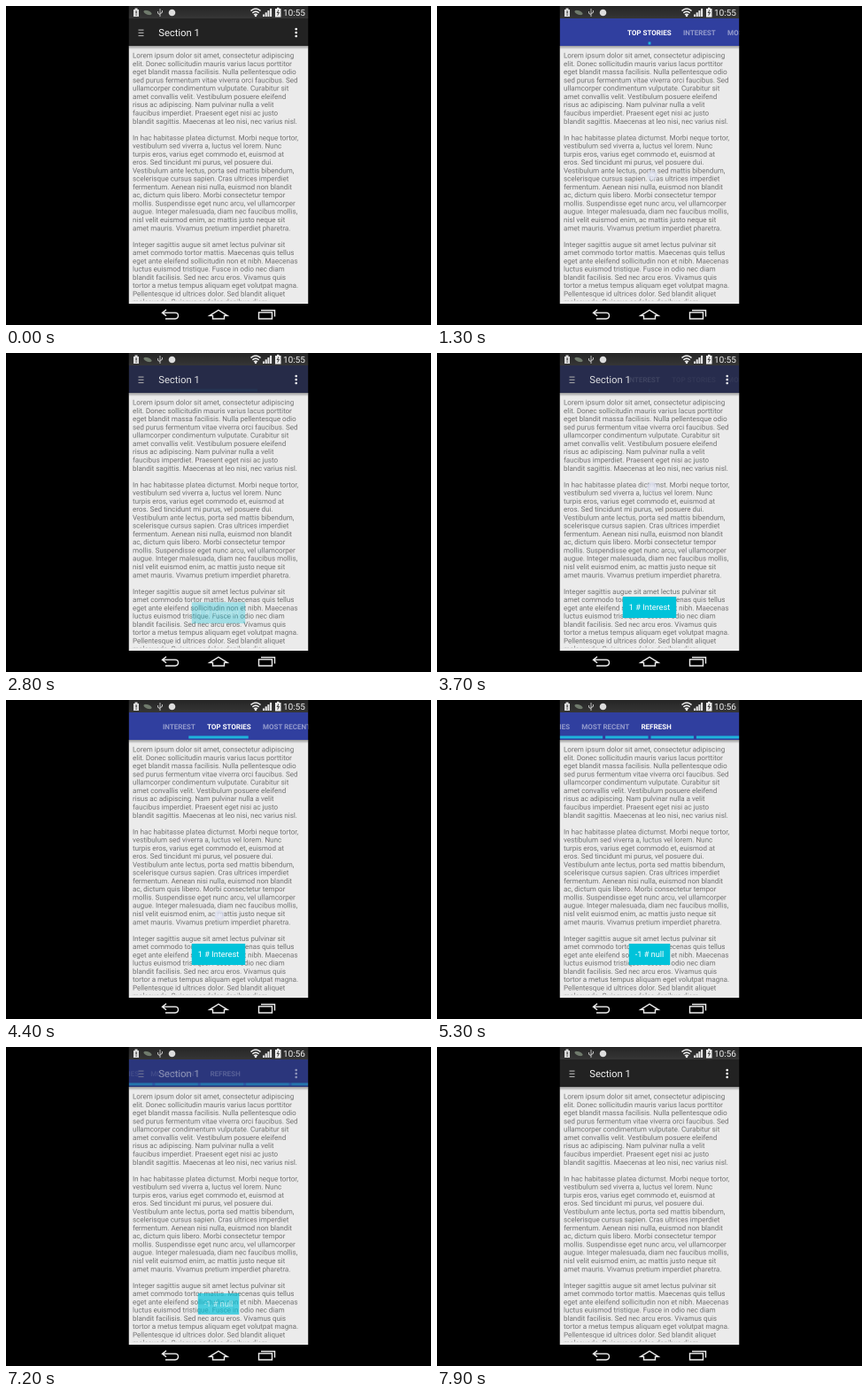
An HTML page with a canvas for the animation above (8 s loop, 480x360 px).

```html
<!DOCTYPE html>
<html lang="en">
<head>
<meta charset="utf-8">
<title>Pull to select</title>
<style>
  html, body { margin: 0; width: 100%; height: 100%; overflow: hidden; background: #000; }
  canvas { display: block; width: 480px; height: 360px; }
</style>
</head>
<body>
<canvas id="stage" width="960" height="720"></canvas>
<script>
const ctx = document.getElementById('stage').getContext('2d');
// Double resolution keeps the small text unhinted and soft.
ctx.scale(2, 2);
ctx.textRendering = 'geometricPrecision';

const LOOP = 8000, LEFT = 138.75, RIGHT = 341.25, WIDTH = RIGHT - LEFT, CENTER = 240;
const BAR_TOP = 14, BAR_BOTTOM = 45, BAR_HEIGHT = BAR_BOTTOM - BAR_TOP;
const BLUE = '#303f9f', CYAN = '#1eb4dc', FONT = 'Roboto, sans-serif', TAB_FONT = `bold 8px ${FONT}`;
const TAB_GAP = 13.3, TAB_START = 215;

const BODY = `Lorem ipsum dolor sit amet, consectetur adipiscing
elit. Donec sollicitudin mauris varius lacus porttitor
eget blandit massa facilisis. Nulla pellentesque odio
sed purus fermentum vitae viverra orci faucibus. Sed
ullamcorper condimentum vulputate. Curabitur sit
amet convallis velit. Vestibulum posuere eleifend
risus ac adipiscing. Nam pulvinar nulla a velit
faucibus imperdiet. Praesent eget nisi ac justo
blandit sagittis. Maecenas at leo nisi, nec varius nisl.

In hac habitasse platea dictumst. Morbi neque tortor,
vestibulum sed viverra a, luctus vel lorem. Nunc
turpis eros, varius eget commodo et, euismod at
eros. Sed tincidunt mi purus, vel posuere dui.
Vestibulum ante lectus, porta sed mattis bibendum,
scelerisque cursus sapien. Cras ultrices imperdiet
fermentum. Aenean nisi nulla, euismod non blandit
ac, dictum quis libero. Morbi consectetur tempor
mollis. Suspendisse eget nunc arcu, vel ullamcorper
augue. Integer malesuada, diam nec faucibus mollis,
nisl velit euismod enim, ac mattis justo neque sit
amet mauris. Vivamus pretium imperdiet pharetra.

Integer sagittis augue sit amet lectus pulvinar sit
amet commodo tortor mattis. Maecenas quis tellus
eget ante eleifend sollicitudin non et nibh. Maecenas
luctus euismod tristique. Fusce in odio nec diam
blandit facilisis. Sed nec arcu eros. Vivamus quis
tortor a metus tempus aliquam eget volutpat magna.
Pellentesque id ultrices dolor. Sed blandit aliquet
malesuada. Quisque sodales dapibus diam.`.split('\n');

// Each pull: finger path as [time, y], tab order, times at which the next tab is picked.
const PULLS = [
  { touch: 600, release: 2620, fadeIn: 900, fadeOut: 2620, x: [244.5, 242],
    path: [[850, 164], [2100, 239], [2600, 283]],
    tabs: ['TOP STORIES', 'INTEREST', 'MOST RECENT', 'REFRESH'], picks: [2290] },
  { touch: 3300, release: 5000, fadeIn: 3600, fadeOut: 7130, x: [243, 241], refresh: true,
    path: [[3550, 138], [3800, 160], [4400, 243], [5000, 315]],
    tabs: ['INTEREST', 'TOP STORIES', 'MOST RECENT', 'REFRESH'], picks: [4306, 4583, 4808] }
];
const TOASTS = [
  { text: '1 # Interest', show: 2715, hide: 4650 },
  { text: '-1 # null', show: 4930, hide: 7120 }
];

const clamp = v => Math.max(0, Math.min(1, v));
const ramp = (t, start, length) => clamp((t - start) / length);
const easeOut = v => 1 - (1 - v) ** 3;

function follow(path, t) {
  let y = path[0][1];
  for (let i = 1; i < path.length; i++) {
    const [t0, y0] = path[i - 1], [t1, y1] = path[i];
    y += (y1 - y0) * ramp(t, t0, t1 - t0);
  }
  return y;
}

function box(x, y, w, h, color) {
  ctx.fillStyle = color;
  ctx.fillRect(x, y, w, h);
}

function shade(top, bottom, from, to) {
  const gradient = ctx.createLinearGradient(0, top, 0, bottom);
  gradient.addColorStop(0, from);
  gradient.addColorStop(1, to);
  box(LEFT, top, WIDTH, bottom - top, gradient);
}

function disc(x, y, r, color) {
  ctx.fillStyle = color;
  ctx.beginPath();
  ctx.arc(x, y, r, 0, 7);
  ctx.fill();
}

function label(text, x, y, font, color, align = 'left') {
  ctx.font = font;
  ctx.fillStyle = color;
  ctx.textAlign = align;
  ctx.fillText(text, x, y);
}

function stroke(d, color = '#eee', width = 1.2) {
  ctx.strokeStyle = color;
  ctx.lineWidth = width;
  ctx.stroke(new Path2D(d));
}

function drawStatusBar(t) {
  shade(0, BAR_TOP, '#262626', '#363636');
  box(144, 4, 6, 8, '#ddd');
  box(145.5, 2.5, 3, 1.5, '#ddd');
  box(146.5, 5.5, 1.2, 3, '#333');
  box(146.5, 9.5, 1.2, 1.2, '#333');
  ctx.fillStyle = '#6f7a6c';
  ctx.beginPath();
  ctx.ellipse(160, 7.5, 4.8, 2.2, .35, 0, 7);
  ctx.fill();
  stroke('M174 3V12M171.5 6V8L174 10M176.5 5V7L174 9', '#bbb', 1);
  disc(187.5, 7.5, 3.8, '#ddd');

  stroke('M276.5 5.5Q282 .8 287.5 5.5M278.3 7.8Q282 4.6 285.7 7.8M280 10Q282 8.2 284 10', '#eee', 1.5);
  disc(282, 11, 1.2, '#eee');
  for (let i = 0; i < 4; i++) box(290 + i * 2.7, 9.5 - i * 2.2, 2, 2.5 + i * 2.2, '#eee');
  box(304, 3, 6.5, 9.5, '#eee');
  box(306, 1.8, 2.5, 1.2, '#eee');
  if (t >= 100 && t < 200) box(305, 4, 4.5, 4, '#aaa');
  stroke('M308 4.5L306.3 7.5H308.3L306.6 10.7', '#444', .9);
  label(t < 4900 ? '10:55' : '10:56', 313, 11.2, `10px ${FONT}`, '#eee');
}

function drawTitle() {
  for (const y of [26.5, 29.7, 32.9]) box(149.5, y, 6, 1.2, '#aaa');
  label('Section 1', 172.3, 34.1, `11.2px ${FONT}`, '#f3f3f3');
  for (const y of [26, 30, 34]) disc(327.7, y, 1.3, '#fff');
}

function drawContent() {
  box(LEFT, BAR_BOTTOM, WIDTH, 336 - BAR_BOTTOM, '#ebebeb');
  ctx.save();
  ctx.beginPath();
  ctx.rect(LEFT, BAR_BOTTOM, WIDTH, 332.5 - BAR_BOTTOM);
  ctx.clip();
  BODY.forEach((line, i) => label(line, 143, 58.6 + i * 9.27, `8px ${FONT}`, '#6e6e6e'));
  ctx.restore();
  shade(BAR_BOTTOM, BAR_BOTTOM + 4, 'rgba(0,0,0,.35)', 'rgba(0,0,0,0)');
}

function drawNavBar() {
  stroke('M181 342.7L176.5 346.2L181 349.7M177 346.2H191Q194.5 346.2 194.5 349.4T191 353H180', '#eee', 1.4);
  stroke('M230 349.4L240 343.2L250 349.4H246.5V353H233.5V349.4Z', '#eee', 1.4);
  stroke('M285.5 345.8H300.5V353H285.5ZM288 343.5H303.5V350.5', '#eee', 1.4);
}

function drawTabs(pull, t) {
  ctx.font = TAB_FONT;
  const widths = pull.tabs.map(name => ctx.measureText(name).width);
  const offsets = widths.map((_, i) => widths.slice(0, i).reduce((sum, w) => sum + w + TAB_GAP, 0));
  const last = widths.length - 1;
  const maxScroll = TAB_START + offsets[last] + widths[last] - (RIGHT - 76.5);
  const scrollTo = i => i === 0 ? 0 :
    Math.min(maxScroll, TAB_START + offsets[i] + widths[i] / 2 - CENTER);
  let scroll = 0, picked = 0;
  pull.picks.forEach((time, i) => {
    scroll += (scrollTo(i + 1) - scrollTo(i)) * easeOut(ramp(t, time, 250));
    if (t >= time) picked = i + 1;
  });
  pull.tabs.forEach((name, i) => label(name, TAB_START + offsets[i] - scroll, 33.1, TAB_FONT,
    i === picked ? '#fff' : 'rgba(255,255,255,.48)'));
}

function drawProgress(pull, t) {
  if (pull.refresh && t >= pull.release) {
    box(LEFT, 40.5, WIDTH, 3, CYAN);
    const period = 51.4, shift = 188.5 + (t - 5300) * .1238 - LEFT;
    const first = ((shift % period) + period) % period;
    for (let x = first; x < WIDTH; x += period) box(LEFT + x - 1.5, 40.5, 3, 3, BLUE);
    return;
  }
  const pulled = clamp((follow(pull.path, t) - pull.path[0][1] - 7) / 170);
  const width = WIDTH * pulled ** 2;
  box(CENTER - width / 2, 40.5, width, 3, CYAN);
}

const headerAlpha = (pull, t) => ramp(t, pull.fadeIn, 300) * (1 - ramp(t, pull.fadeOut, 260));

function drawActionBar(t) {
  box(LEFT, BAR_TOP, WIDTH, BAR_HEIGHT, '#222');
  ctx.save();
  ctx.beginPath();
  ctx.rect(LEFT, BAR_TOP, WIDTH, BAR_HEIGHT);
  ctx.clip();
  let shown = 0;
  for (const pull of PULLS) {
    const alpha = headerAlpha(pull, t);
    if (!alpha) continue;
    shown = alpha;
    ctx.globalAlpha = alpha;
    box(LEFT, BAR_TOP, WIDTH, BAR_HEIGHT, BLUE);
    ctx.globalAlpha = alpha * (1 - ramp(t, pull.fadeOut, 230));
    drawProgress(pull, t);
    ctx.globalAlpha = alpha * alpha * (1 - ramp(t, pull.fadeOut, 120));
    drawTabs(pull, t);
  }
  ctx.globalAlpha = 1 - shown * shown;
  drawTitle();
  ctx.restore();
}

function drawTouch(pull, t) {
  if (t < pull.touch || t >= pull.release) return;
  const y = follow(pull.path, t);
  const x = pull.x[0] + (pull.x[1] - pull.x[0]) * ramp(t, pull.fadeIn, 800);
  const glow = ctx.createRadialGradient(x, y, 0, x, y, 6.5);
  glow.addColorStop(0, 'rgba(240,242,252,.85)');
  glow.addColorStop(.7, 'rgba(215,219,238,.7)');
  glow.addColorStop(1, 'rgba(215,219,238,0)');
  disc(x, y, 6.5, glow);
}

function drawToast({ text, show, hide }, t) {
  const alpha = ramp(t, show, 280) * (1 - ramp(t, hide, 250));
  if (!alpha) return;
  const font = `9.2px ${FONT}`;
  ctx.font = font;
  const width = ctx.measureText(text).width + 14;
  const y = 275 + 9 * (1 - alpha);
  ctx.save();
  ctx.globalAlpha = alpha;
  box(CENTER - width / 2, y, width, 24, '#00c3da');
  label(text, CENTER, y + 15.2, font, '#fff', 'center');
  ctx.restore();
}

function draw(now) {
  const t = now % LOOP;
  box(0, 0, 480, 360, '#000');
  drawStatusBar(t);
  drawContent();
  drawActionBar(t);
  drawNavBar();
  TOASTS.forEach(toast => drawToast(toast, t));
  PULLS.forEach(pull => drawTouch(pull, t));
}

const begin = performance.now();
function tick() {
  draw(performance.now() - begin);
  requestAnimationFrame(tick);
}
tick();
</script>
</body>
</html>
```
